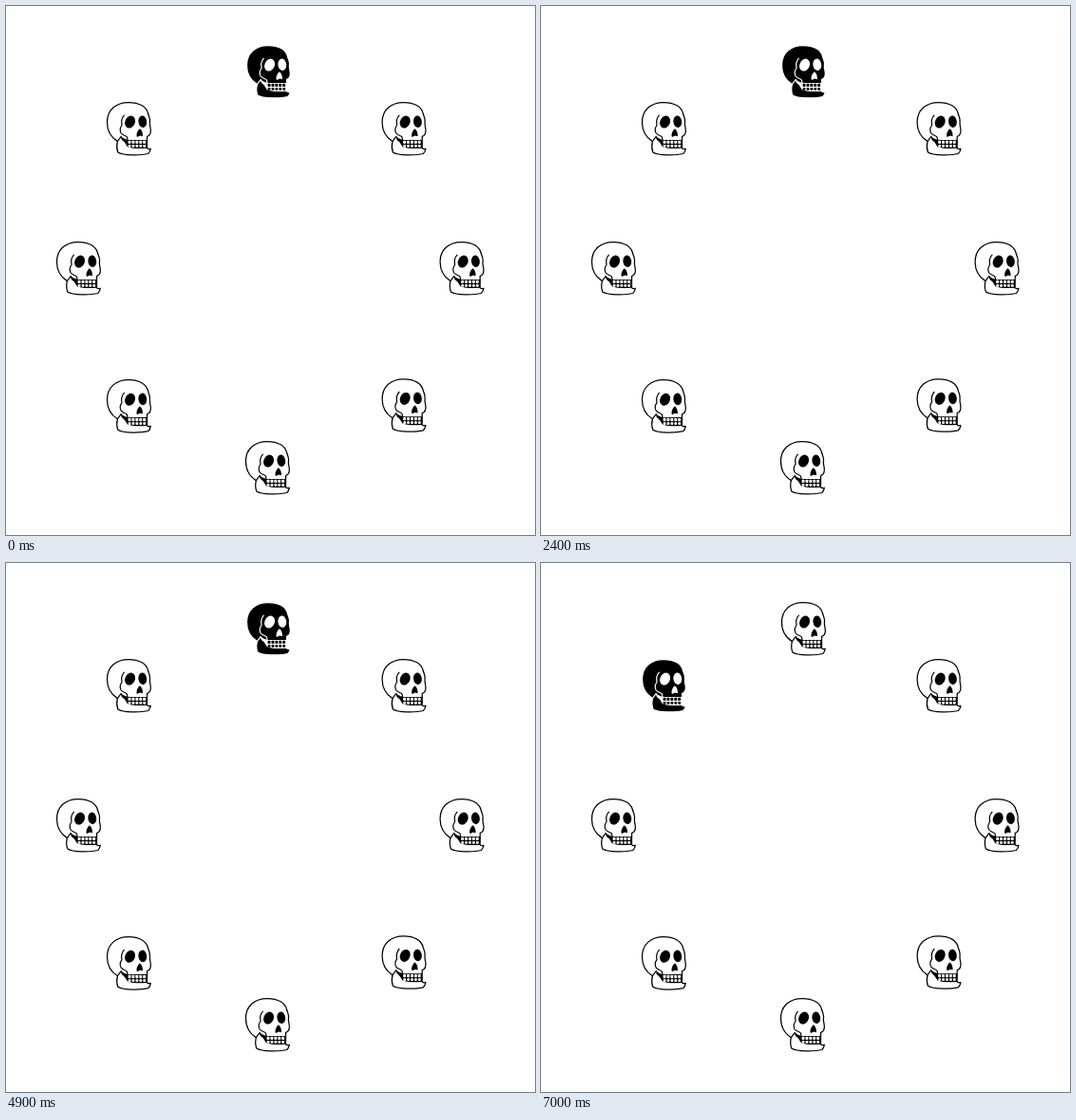
These frames come from a looping animation (557 px wide and 557 px high, 7.3 s). An HTML page:

```html
<!DOCTYPE html>
<html lang="en">
<head>
<meta charset="utf-8">
<title>Skull ring</title>
<style>
  html, body { margin: 0; width: 100%; height: 100%; overflow: hidden; background: #fff; }
  svg { display: block; width: 100%; height: 100%; }
  .skull { --ink: #000; --paper: #fff; }
  .skull.lit { --ink: #fff; --paper: #000; }
  .bone { fill: var(--paper); stroke: var(--ink); stroke-width: 1.25; stroke-linejoin: round; }
  .hole { fill: var(--ink); }
  .tooth { fill: var(--paper); }
  .line { fill: none; stroke: var(--ink); stroke-width: 1.2; stroke-linecap: round; }
</style>
</head>
<body>
<svg id="stage" viewBox="0 0 557 557"></svg>
<script>
  const STEP = 300, LOOP = 7300;
  const LONG_STEP = 14, LONG_EXTRA = 100;

  // Clockwise from the top
  const SPOTS = [
    [252, 40], [394.6, 100], [455.6, 247], [394.6, 391.3],
    [251, 457], [105, 392.2], [52, 247], [105, 100]
  ];

  function teeth() {
    let out = '';
    for (let col = 0; col < 5; col++) {
      const x = 23.6 + col * 3.9;
      out += `<rect class="tooth" x="${x}" y="41.7" width="2.9" height="3.3" rx=".7"/>` +
             `<rect class="tooth" x="${x + 0.1}" y="46" width="2.8" height="2.7" rx=".7"/>`;
    }
    return out;
  }

  const SKULL = `
    <path class="bone" d="M12.4 42.6 C7.5 39.5 1.5 33 1.5 22.5 C1.5 9 11 1.5 24 1.5
      C36 1.5 43 6.5 44.5 13 C45.2 16 47 18 46.5 22 C46 25 47 27 47.3 30
      C47.6 34 45.8 36.8 43.6 37.3 L43.5 49.8 C45 50.8 46.4 50.6 47.3 50.2
      C47 53 46.2 54.2 44.8 55.5 C38 57.3 18 57.8 12.8 54 C11.7 51 11.5 46 12.4 42.6Z"/>
    <path class="line" d="M19.4 15.2 C17 17.8 16.2 21.5 17 25.5 C15.2 28 14.8 31.5 16.2 34
      C18 36.5 21 36 22.5 38.2 L23 41"/>
    <path class="line" d="M12.4 42.6 C13.5 41.2 14.5 39.5 16.3 37.4"/>
    <ellipse class="hole" cx="25.6" cy="22.1" rx="5.2" ry="6.7" transform="rotate(24 25.6 22.1)"/>
    <ellipse class="hole" cx="38.8" cy="21.7" rx="4.4" ry="6.3" transform="rotate(-7 38.8 21.7)"/>
    <path class="hole" d="M35.8 29.2 C38 30.5 39.3 34 38.9 37.3 L36.2 36.6 L33 38 C31.7 35 33.5 31.3 35.8 29.2Z"/>
    <path class="hole" d="M16.2 37 C18.6 39.8 21 40.5 24 41 L43.7 40.9 L43.5 49.7
      C37 50.2 28 50.5 23 48.3 C21.3 46.5 21 43.8 18.4 42.2 C16.6 41 15.8 39.2 16.2 37Z"/>
    ${teeth()}`;

  const stage = document.getElementById('stage');
  stage.innerHTML = SPOTS.map(([x, y]) =>
    `<g class="skull" transform="translate(${x} ${y})">${SKULL}</g>`).join('');
  const skulls = [...stage.children];

  function stepAt(t) {
    const longEnd = (LONG_STEP + 1) * STEP;
    if (t < longEnd) return Math.floor(t / STEP);
    return Math.max(LONG_STEP, Math.floor((t - LONG_EXTRA) / STEP));
  }

  function render(t) {
    const lit = stepAt(t) % skulls.length;
    skulls.forEach((skull, i) => skull.classList.toggle('lit', i === lit));
  }

  const start = performance.now();
  function tick() {
    render((performance.now() - start) % LOOP);
    requestAnimationFrame(tick);
  }
  render(0);
  requestAnimationFrame(tick);
</script>
</body>
</html>
```
